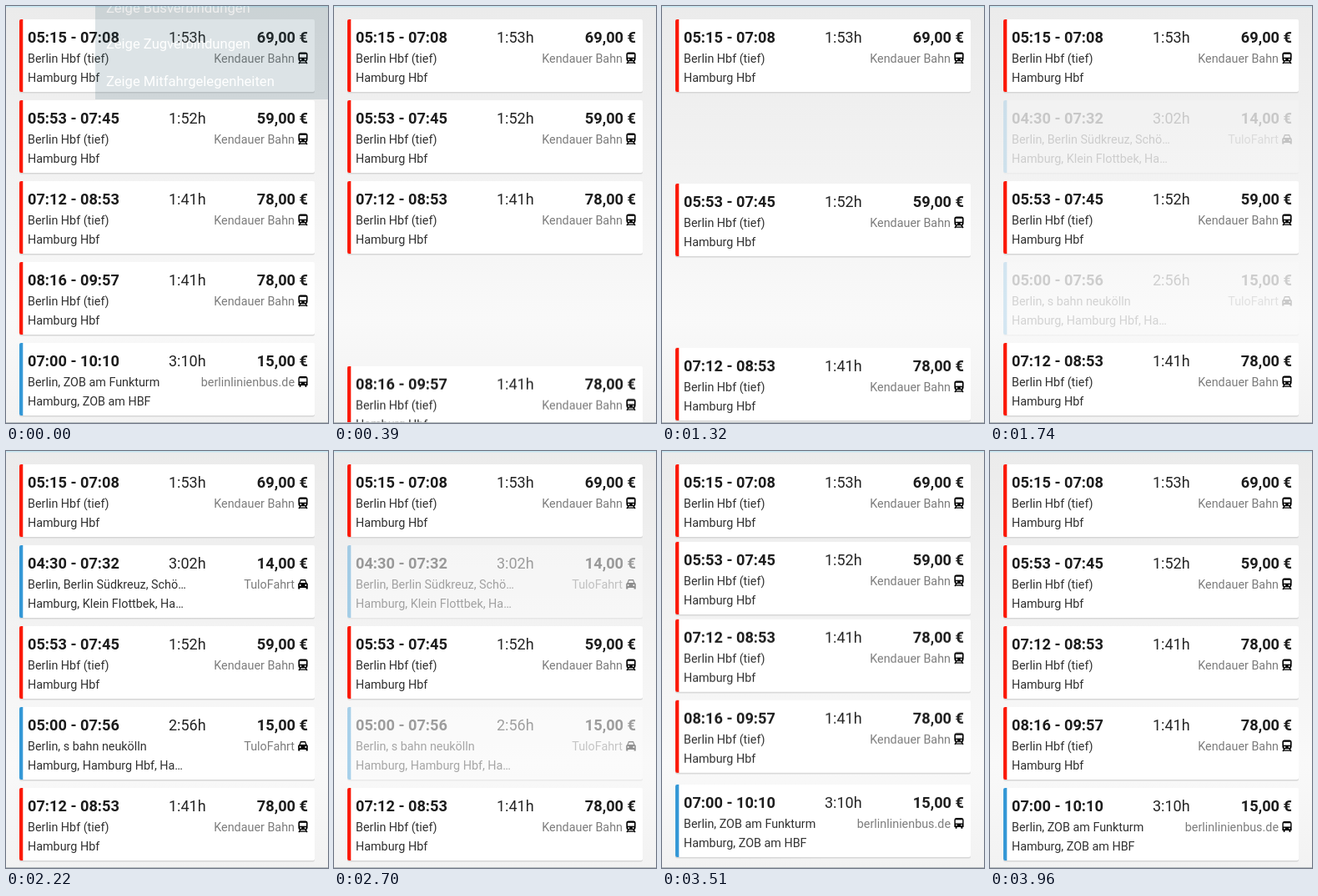
Recreate the animation shown at these times as an HTML page. Size 386 by 500 pixels, loop 4230 ms.

```html
<!DOCTYPE html>
<html lang="de">
<head>
<meta charset="utf-8">
<title>Verbindungen</title>
<style>
  html, body { margin: 0; height: 100%; overflow: hidden; background: #f2f2f2; }
  svg { display: block; width: 100vw; height: 100vh; }
  text { font: 14.35px Roboto, sans-serif; fill: #303030; }
  .time, .price { font-size: 18.2px; font-weight: 700; fill: #1c1c1c; }
  .span { font-size: 18px; fill: #242424; }
  .firm { fill: #7c7c7c; }
  .price, .firm { text-anchor: end; }
  #menu text { font-size: 16.6px; fill: #fff; }
</style>
</head>
<body>
<svg viewBox="0 0 386 500">
  <defs>
    <linearGradient id="paper" x2="0" y2="1">
      <stop offset="0" stop-color="#ebebeb"/>
      <stop offset=".45" stop-color="#f3f3f3"/>
      <stop offset=".75" stop-color="#f9f9f9"/>
      <stop offset="1" stop-color="#f2f2f2"/>
    </linearGradient>
    <g id="train">
      <path d="M3 0H9Q11.6 0 11.6 2.5V8.3Q11.6 10.8 9.2 10.8H2.8Q.4 10.8 .4 8.3V2.5Q.4 0 3 0Z"/>
      <path d="M3 10.5L1 13.6M9 10.5L11 13.6M2 12.6H10" stroke="#000" stroke-width="1.4"/>
      <path d="M2 2.3H10V6.2H2Z" fill="#fff"/>
      <circle cx="3.3" cy="8.5" r="1" fill="#fff"/>
      <circle cx="8.7" cy="8.5" r="1" fill="#fff"/>
    </g>
    <g id="bus">
      <path d="M2.6 .5H9.4Q11.6 .5 11.6 3V11.4H10.4V13.2H8.4V11.4H3.6V13.2H1.6V11.4H.4V3Q.4 .5 2.6 .5Z"/>
      <path d="M1.8 2.8H10.2V7H1.8Z" fill="#fff"/>
      <circle cx="3" cy="9.1" r=".9" fill="#fff"/>
      <circle cx="9" cy="9.1" r=".9" fill="#fff"/>
    </g>
    <g id="car">
      <path d="M3 1.5H9L10.4 5.2L11.8 6.8V13H9.6V11.5H2.4V13H.2V6.8L1.6 5.2Z"/>
      <path d="M3.7 2.9H8.3L9.1 5.6H2.9Z" fill="#fff"/>
      <circle cx="2.7" cy="8.4" r="1" fill="#fff"/>
      <circle cx="9.3" cy="8.4" r="1" fill="#fff"/>
    </g>
  </defs>
  <rect width="386" height="500" fill="url(#paper)"/>
  <g id="list"></g>
  <rect width="386" height="1.5" fill="#c6e6f1"/>
  <rect y="499" width="386" height="1" fill="#b4babd"/>
  <g id="menu">
    <rect x="107" width="279" height="112" fill="#36606f"/>
    <text x="120" y="8">Zeige Busverbindungen</text>
    <text x="120" y="51">Zeige Zugverbindungen</text>
    <text x="120" y="96">Zeige Mitfahrgelegenheiten</text>
  </g>
</svg>
<script>
const LOOP = 4230;
const RED = '#fb1a08', BLUE = '#3498d6';
// Cubic overshoot that settles at the end
const SPRING = 'cubic-bezier(.3333, 1.3833, .6667, 1)';
const OUT = 600, OUT_END = 1510, BACK = 2938, BACK_END = 3938;
const LEAVE = 270, LEAVE_END = 1270, BELOW = 501;

const kinds = {
  train: { color: RED, firm: 'Kendauer Bahn' },
  bus: { color: BLUE, firm: 'berlinlinienbus.de' },
  car: { color: BLUE, firm: 'TuloFahrt' }
};

// Steps are [ms, value, easing towards the next step]
const shift = (from, to) => [
  [0, from], [OUT, from, SPRING], [OUT_END, to], [BACK, to, SPRING], [BACK_END, from]
];
const leave = (from, to) => [
  [0, from], [LEAVE, from, SPRING], [LEAVE_END, to], [LEAVE_END, BELOW],
  [BACK, BELOW, SPRING], [BACK_END, from]
];
const fade = [[0, 0], [1630, 0], [2220, 1], [2400, 1], [2910, 0]];
const flash = [[0, .17], [150, 0], [2400, 0], [2400, .17], [2550, 0]];

const station = ['Berlin Hbf (tief)', 'Hamburg Hbf'];
const trips = [
  { kind: 'train', time: '05:15 - 07:08', span: '1:53h', price: '69,00 €', stops: station, y: [[0, 16]] },
  { kind: 'car', time: '04:30 - 07:32', span: '3:02h', price: '14,00 €',
    stops: ['Berlin, Berlin Südkreuz, Schö…', 'Hamburg, Klein Flottbek, Ha…'], y: [[0, 113]], alpha: fade },
  { kind: 'train', time: '05:53 - 07:45', span: '1:52h', price: '59,00 €', stops: station, y: shift(113, 210) },
  { kind: 'car', time: '05:00 - 07:56', span: '2:56h', price: '15,00 €',
    stops: ['Berlin, s bahn neukölln', 'Hamburg, Hamburg Hbf, Ha…'], y: [[0, 307]], alpha: fade },
  { kind: 'train', time: '07:12 - 08:53', span: '1:41h', price: '78,00 €', stops: station, y: shift(210, 404) },
  { kind: 'train', time: '08:16 - 09:57', span: '1:41h', price: '78,00 €', stops: station, y: leave(307, 598) },
  { kind: 'bus', time: '07:00 - 10:10', span: '3:10h', price: '15,00 €',
    stops: ['Berlin, ZOB am Funkturm', 'Hamburg, ZOB am HBF'], y: leave(404, 695) }
];

function play(el, prop, steps, format = v => v) {
  const last = steps[steps.length - 1];
  const frames = [...steps, [LOOP, last[1]]].map(([ms, value, easing = 'linear']) =>
    ({ offset: ms / LOOP, [prop]: format(value), easing }));
  el.animate(frames, { duration: LOOP, iterations: Infinity });
}

function addCard({ kind, time, span, price, stops, y, alpha }) {
  const { color, firm } = kinds[kind];
  const card = document.createElementNS('http://www.w3.org/2000/svg', 'g');
  card.innerHTML = `
    <rect x="16" y="1.4" width="354" height="87" rx="2" fill="#d6d6d6"/>
    <rect x="16" width="354" height="87" rx="2" fill="#fff"/>
    <path d="M20.3 0H18Q16 0 16 2V85Q16 87 18 87H20.3Z" fill="${color}"/>
    <text class="time" x="26" y="27.5">${time}</text>
    <text class="span" x="195" y="27.5">${span}</text>
    <text class="price" x="362" y="27.5">${price}</text>
    <text x="26" y="51.5">${stops[0]}</text>
    <text x="26" y="75">${stops[1]}</text>
    <text class="firm" x="346" y="51.5">${firm}</text>
    <use href="#${kind}" x="350" y="39.5"/>`;
  document.getElementById('list').append(card);
  play(card, 'transform', y, v => `translateY(${v}px)`);
  if (alpha) play(card, 'opacity', alpha);
}

trips.forEach(addCard);
play(document.getElementById('menu'), 'opacity', flash);
</script>
</body>
</html>
```
